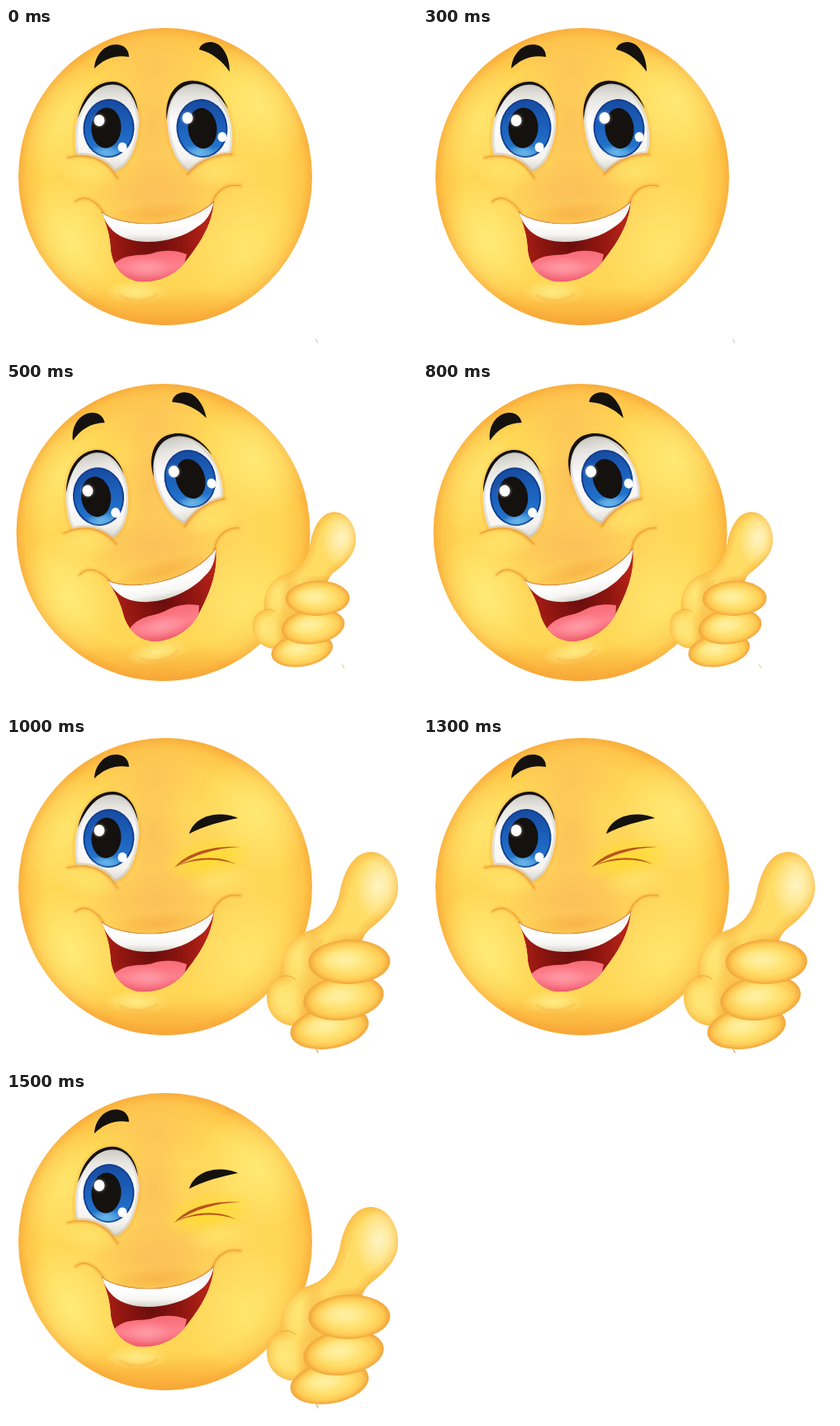
An HTML page with a canvas that plays this animation: 498 px wide and 396 px high, repeating every 2 s.

```html
<!DOCTYPE html>
<html lang="en">
<head>
<meta charset="utf-8">
<title>Winking smiley</title>
<style>
html, body { margin: 0; width: 100%; height: 100%; overflow: hidden; background: #fff; }
canvas { display: block; }
</style>
</head>
<body>
<canvas id="stage" width="498" height="396"></canvas>
<script>
const ctx = document.getElementById('stage').getContext('2d');
const INK = '#14110f';

function fill(path, style) {
  ctx.fillStyle = style;
  ctx.fill(new Path2D(path));
}

function stroke(path, style, width) {
  ctx.strokeStyle = style;
  ctx.lineWidth = width;
  ctx.lineCap = 'round';
  ctx.stroke(new Path2D(path));
}

// Skin crease: a thin line inside a faint shadow
function crease(path) {
  stroke(path, 'rgba(240,155,45,.12)', 7);
  stroke(path, 'rgba(238,150,45,.2)', 4);
  stroke(path, 'rgba(228,138,40,.6)', 1.3);
}

function addStops(gradient, stops) {
  stops.forEach(([at, color]) => gradient.addColorStop(at, color));
  return gradient;
}

function radial(x, y, r, ...stops) {
  return addStops(ctx.createRadialGradient(x, y, 0, x, y, r), stops);
}

function vertical(top, bottom, ...stops) {
  return addStops(ctx.createLinearGradient(0, top, 0, bottom), stops);
}

function ellipse(x, y, rx, ry, style, tilt = 0) {
  ctx.beginPath();
  ctx.ellipse(x, y, rx, ry, tilt, 0, Math.PI * 2);
  ctx.fillStyle = style;
  ctx.fill();
}

// Soft-edged elliptical patch of light or shade
function glow(x, y, rx, ry, rgb, alpha, tilt = 0) {
  ctx.save();
  ctx.translate(x, y);
  ctx.rotate(tilt);
  ctx.scale(rx, ry);
  ellipse(0, 0, 1, 1, radial(0, 0, 1,
    [0, `rgba(${rgb},${alpha})`], [0.5, `rgba(${rgb},${alpha * 0.55})`], [1, `rgba(${rgb},0)`]));
  ctx.restore();
}

function clipped(path, draw) {
  ctx.save();
  ctx.clip(new Path2D(path));
  draw();
  ctx.restore();
}

function drawHead() {
  ctx.save();
  ctx.beginPath();
  ctx.ellipse(193, 180, 178, 180, 0, 0, Math.PI * 2);
  ctx.clip();
  ctx.fillStyle = radial(193, 180, 180,
    [0, '#fecd5a'], [0.55, '#ffd75a'], [0.8, '#ffd754'], [0.93, '#fec648'], [1, '#f9ac3a']);
  ctx.fillRect(0, -10, 400, 400);
  const light = '255,236,122', peach = '252,190,88', shade = '247,162,52';
  glow(305, 90, 65, 75, light, 0.85, -0.6);
  glow(68, 112, 45, 75, light, 0.65, 0.4);
  glow(78, 258, 52, 78, light, 0.95, -0.4);
  glow(292, 265, 68, 80, light, 0.65, 0.5);
  glow(180, 42, 75, 48, peach, 0.7);
  glow(178, 115, 36, 80, peach, 0.75);
  glow(180, 198, 78, 42, peach, 0.9);
  glow(190, 362, 130, 52, shade, 0.7);
  ctx.restore();
}

const LEFT_EYE = {
  white: 'M84 145C81 104 99 66 128 66C151 66 162 94 161 117C159 150 145 172 130 174C122 160 104 153 86 154Z',
  lash: 'M87 109C93 80 111 64 130 65C147 66 158 82 160 101C155 82 146 69 130 68.5C112 68 98 83 87 109Z',
  iris: [124.5, 121.5, 31, 35.5], pupil: [121.5, 121, 18, 24.5], tilt: 0.06,
  glints: [113, 112, 141, 144.5]
};
const RIGHT_EYE = {
  white: 'M195 112C194 84 208 66 228 66C252 66 272 95 274 125C275 138 274 147 271 152C250 154 233 163 222 174C211 169 197 148 195 112Z',
  lash: 'M195 112C191 83 207 62 228 64C247 65 262 79 269 98C258 79 245 68 228 67.5C210 68 196 84 195 112Z',
  iris: [237.5, 121.5, 31, 35.5], pupil: [238, 121.5, 17.5, 24.5], tilt: -0.1,
  glints: [220, 109, 262, 132]
};

function drawEye({ white, lash, iris, pupil, tilt, glints }) {
  stroke(white, 'rgba(240,150,45,.18)', 7);
  clipped(white, () => {
    fill(white, vertical(65, 174, [0, '#c5c3bd'], [0.17, '#e6e4df'], [0.45, '#ffffff'], [0.85, '#f5f3ee'], [1, '#d8d5ce']));
    stroke(white, 'rgba(160,155,145,.25)', 6);
    const [x, y, rx, ry] = iris;
    ellipse(x, y, rx, ry, '#123f91', tilt);
    ellipse(x, y, rx - 2, ry - 2,
      vertical(y - ry, y + ry, [0, '#174a9f'], [0.5, '#1c62bd'], [0.8, '#2272ca'], [1, '#55abe3']), tilt);
    glow(x - 3, y + 28, 18, 9, '150,220,255', 0.5);
  });
  ellipse(...pupil, INK, tilt);
  const [x1, y1, x2, y2] = glints;
  glow(x1, y1, 10, 10, '255,255,255', 0.5);
  ellipse(x1, y1, 6.5, 7, '#fff');
  ellipse(x2, y2, 5.5, 6, '#fff');
  fill(lash, INK);
}

function drawWink() {
  glow(246, 146, 56, 27, '255,222,45', 0.9, -0.2);
  fill('M204 157C220 138 250 130 284 132C254 133 228 141 204 157Z', '#b9551e');
  fill('M207 155C232 142 260 143 279 153C258 145.5 232 145.5 207 155Z', '#b9551e');
  fill('M222 116C226 102 240 93 258 92.5C268 92.5 276 94.5 281 97C262 101 240 106 222 116Z', INK);
}

function drawCheeks(winking) {
  glow(98, 173, 42, 20, '255,230,110', 0.75, 0.2);
  glow(257, 173, 40, 20, '255,230,110', 0.75, -0.2);
  crease('M75 157C98 151 121 157 135 182');
  if (!winking) crease('M220 177C235 159 258 152 274 153');
  crease('M84 210C95 202 107 207 118 223');
  crease('M250 212C255 196 268 188 284 191');
}

function drawMouth() {
  const mouth = 'M116 223C142 243 218 244 252 210C250 240 232 265 216 285C201 303 178 309 160 307C141 303 130 290 127 270C126 250 122 240 116 223Z';
  const teeth = 'M116 223C142 243 218 244 252 210C249 224 243 234 233 240C205 262 152 266 130 246C123 239 119 232 116 223Z';
  glow(182, 226, 70, 16, '244,160,55', 0.5, -0.08);
  clipped(mouth, () => {
    fill(mouth, radial(178, 262, 68, [0, '#6a0d0d'], [0.5, '#8d1510'], [1, '#b52318']));
    const tongue = 'M129 288C144 271 164 277 177 273C191 268 207 269 219 274L210 312H142Z';
    fill(tongue, vertical(270, 308, [0, '#f66c78'], [0.5, '#ff808d'], [1, '#f05c6e']));
    glow(171, 291, 32, 14, '255,165,175', 0.75);
    fill(teeth, vertical(215, 260, [0, '#f1f0ed'], [0.5, '#ffffff'], [0.78, '#f6f5f2'], [1, '#cfccc6']));
  });
  stroke('M116 223C142 243 218 244 252 210', 'rgba(190,105,35,.55)', 1.2);
  glow(158, 320, 40, 14, '255,236,135', 0.95);
  stroke('M138 324C150 332 170 332 183 323', 'rgba(242,165,55,.25)', 4);
}

function drawFace(winking) {
  drawEye(LEFT_EYE);
  fill('M107 49C108 32 120 19 135 20C145 21 149 28 149 35C132 32 118 38 107 49Z', INK);
  if (winking) {
    drawWink();
  } else {
    drawEye(RIGHT_EYE);
    fill('M234 26C236 17 250 13 260 22C268 30 271 42 271 53C262 40 250 30 234 26Z', INK);
  }
  drawCheeks(winking);
  drawMouth();
}

function drawFinger(x, y, rx, ry, tilt) {
  ctx.save();
  ctx.translate(x, y);
  ctx.rotate(tilt);
  ctx.scale(rx, ry);
  ellipse(0, 0, 1, 1, radial(0, 0, 1,
    [0, '#ffe885'], [0.55, '#ffdf6c'], [0.82, '#fecb54'], [1, '#f2a43a']));
  ctx.restore();
  glow(x - rx * 0.15, y - ry * 0.1, rx * 0.65, ry * 0.55, '255,244,175', 0.75, tilt);
}

function drawHand() {
  const palm = 'M442 138C462 138 476 160 475 183C474 205 455 220 440 232C434 238 432 243 430 250L380 300L362 347C338 354 315 338 316 313C316 300 322 292 334 289C330 262 345 240 368 233C393 224 401 204 405 184C410 160 422 138 442 138Z';
  clipped(palm, () => {
    fill(palm, '#ffdc64');
    // Nested translucent strokes shade the rim inward
    for (const width of [22, 15, 9, 5, 2]) stroke(palm, 'rgba(247,166,53,.15)', width);
    glow(452, 178, 29, 42, '255,244,195', 1, 0.2);
    glow(358, 266, 28, 28, '255,234,125', 0.8);
    glow(338, 318, 24, 27, '255,234,130', 0.8);
    glow(374, 270, 18, 44, '240,155,45', 0.45);
    glow(365, 320, 16, 40, '240,155,45', 0.4);
    glow(423, 246, 35, 12, '240,155,45', 0.5);
  });
  stroke('M334 289C339 287 345 288 350 292', 'rgba(237,158,56,.7)', 1.3);
  drawFinger(392, 351, 48, 25, -0.17);
  drawFinger(409, 314.5, 49, 27, -0.14);
  drawFinger(416, 271, 49.5, 27, -0.02);
}

const tilted = { angle: -11 * Math.PI / 180, dx: -2.5, dy: 2 };
const upright = { angle: 0, dx: 0, dy: 0 };
const wink = { pose: upright, winking: true, hand: { x: 0, y: 0, scale: 1 }, speck: [377, 379, '#e3b36a'] };
const POSES = [
  { pose: upright, winking: false, hand: null, speck: [376.5, 379, '#d6d6d2'] },
  { pose: tilted, winking: false, hand: { x: 51, y: 48, scale: 0.785 }, speck: [408.5, 343, '#eadc9a'] },
  wink,
  wink
];

function drawScene({ pose, winking, hand, speck }) {
  ctx.fillStyle = '#fff';
  ctx.fillRect(0, 0, 498, 396);

  ctx.save();
  ctx.translate(pose.dx, pose.dy / 2);
  drawHead();
  ctx.restore();

  ctx.save();
  ctx.translate(193 + pose.dx, 180 + pose.dy);
  ctx.rotate(pose.angle);
  ctx.translate(-193, -180);
  drawFace(winking);
  ctx.restore();

  const [x, y, color] = speck;
  stroke(`M${x - 1} ${y - 2}L${x + 1} ${y + 2}`, color, 1.5);

  if (hand) {
    ctx.save();
    ctx.translate(hand.x, hand.y);
    ctx.scale(hand.scale, hand.scale);
    drawHand();
    ctx.restore();
  }
}

const start = performance.now();
function tick() {
  const time = (performance.now() - start) % 2000;
  drawScene(POSES[Math.floor(time / 500)]);
  requestAnimationFrame(tick);
}
tick();
</script>
</body>
</html>
```
